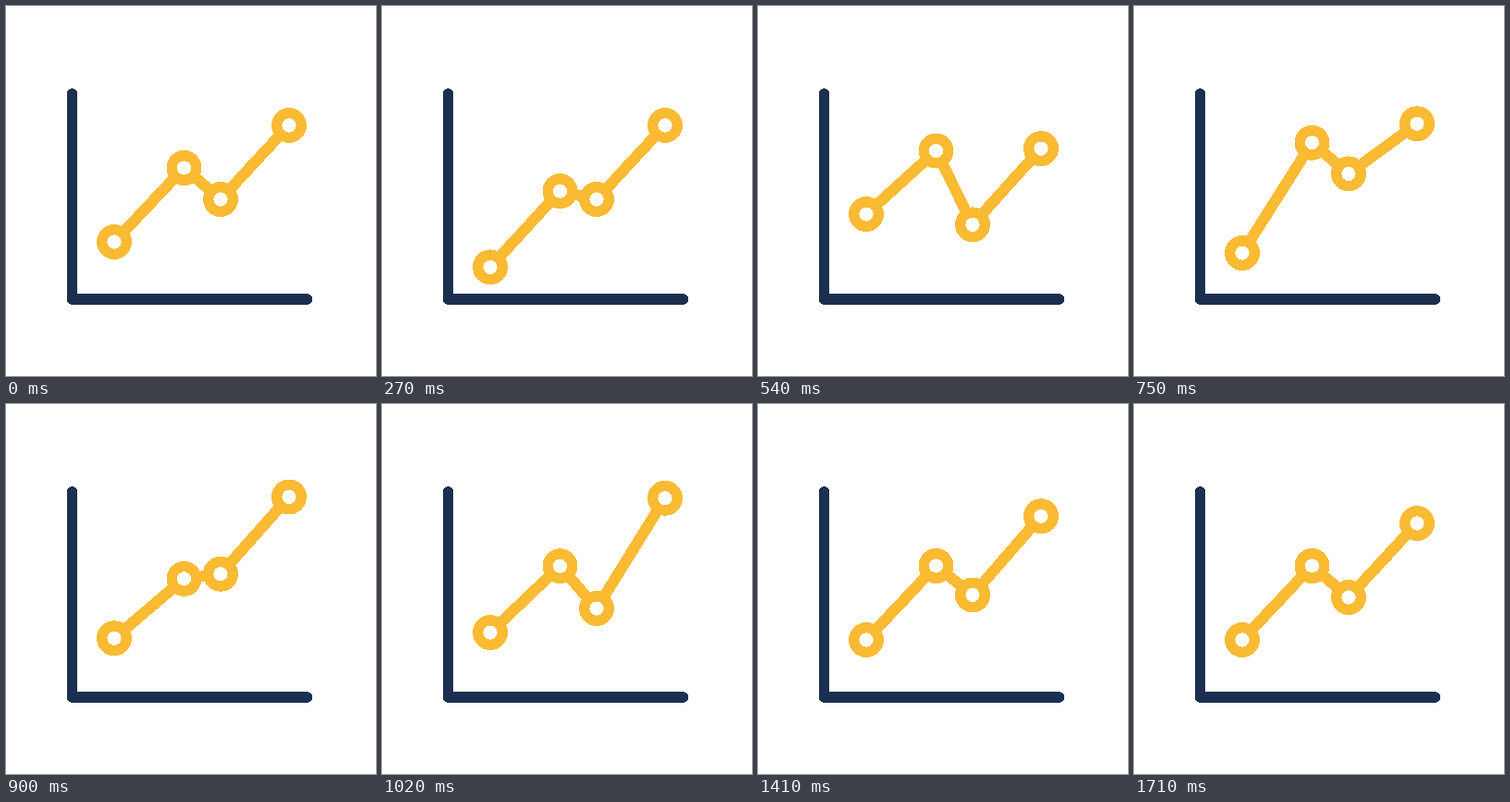
Recreate the animation shown at these times as an HTML page without scripts. Size 400x400 px, loop 1.74 s.

```html
<!DOCTYPE html>
<html lang="en">
<head>
<meta charset="utf-8">
<title>Line chart</title>
<style>
  @property --lift { syntax: "<number>"; inherits: false; initial-value: 0; }
  @property --from { syntax: "<number>"; inherits: true; initial-value: 0; }

  html, body { margin: 0; width: 100%; height: 100%; overflow: hidden; background: #fff; }
  svg { display: block; width: 100%; height: 100%; shape-rendering: crispEdges; }

  .axis { fill: none; stroke: #1c2f50; stroke-width: 11.5; stroke-linecap: round; stroke-linejoin: round; }

  /* One damped bounce, passed along the points from left to right */
  .point { animation: bounce 1740ms calc(var(--i) * 135ms) infinite; }
  @keyframes bounce {
    0%    { --lift: 0; animation-timing-function: ease; }
    14.5% { --lift: 30; animation-timing-function: ease; }
    32%   { --lift: -30; animation-timing-function: cubic-bezier(.66, 0, .55, 1); }
    45.5% { --lift: 15; animation-timing-function: ease; }
    60%   { --lift: -8; animation-timing-function: ease; }
    74%, 100% { --lift: 0; }
  }

  circle { fill: #fff; stroke: #faba32; stroke-width: 11.3; transform: translateY(calc(var(--lift) * 1px)); }

  /* A unit line, turned and stretched from its left point to its right one */
  g.point { --from: var(--lift); }
  line {
    --rise: calc(var(--h) + var(--lift) - var(--from));
    stroke: #faba32;
    stroke-width: 12;
    transform:
      translate(calc(var(--x) * 1px), calc((var(--y) + var(--from)) * 1px))
      rotate(atan2(var(--rise), var(--w)))
      scaleX(hypot(var(--rise), var(--w)));
  }
</style>
</head>
<body>
<svg viewBox="0 0 400 400">
  <path class="axis" d="M71.5 95V317H325.5"/>

  <g class="point" style="--i:0; --x:117; --y:255; --w:75.5; --h:-80">
    <line class="point" style="--i:1" x2="1"/>
  </g>
  <g class="point" style="--i:1; --x:192.5; --y:175; --w:39.5; --h:34">
    <line class="point" style="--i:2" x2="1"/>
  </g>
  <g class="point" style="--i:2; --x:232; --y:209; --w:74; --h:-80">
    <line class="point" style="--i:3" x2="1"/>
  </g>

  <circle class="point" style="--i:0" cx="117" cy="255" r="13.3"/>
  <circle class="point" style="--i:1" cx="192.5" cy="175" r="13.3"/>
  <circle class="point" style="--i:2" cx="232" cy="209" r="13.3"/>
  <circle class="point" style="--i:3" cx="306" cy="129" r="13.3"/>
</svg>
</body>
</html>
```
